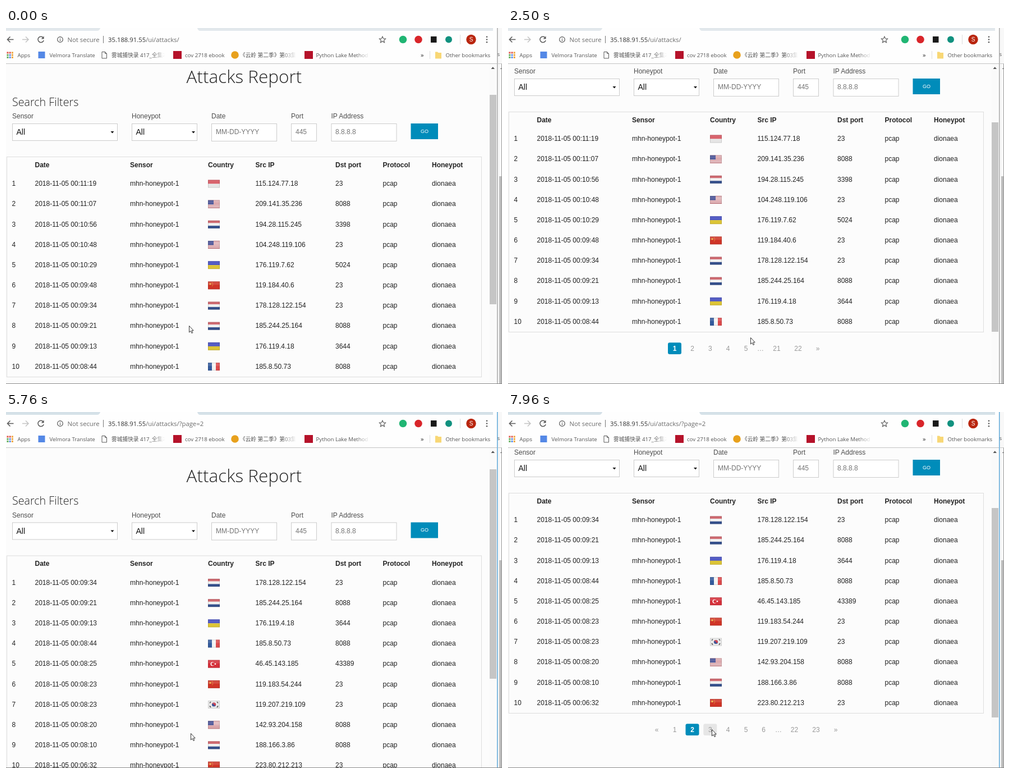
Animation of 884x634 px, one loop 8000 ms. Source, as an HTML page:

```html
<!DOCTYPE html>
<html lang="en">
<head>
<meta charset="utf-8">
<title>Attacks Report</title>
<style>
html, body { margin: 0; width: 100%; height: 100%; overflow: hidden; background: #fefefe; }
svg { display: block; }
text { font: 12px "Liberation Sans", Arial, sans-serif; fill: #222; white-space: pre; }
.bold { font-weight: bold; }
.light { font-family: "Open Sans", sans-serif; font-weight: 300; }
.h1 { font-size: 31.5px; }
.h2 { font-size: 19.7px; }
.label { fill: #4d4d4d; }
.hint { fill: #757575; }
.all { font-size: 14px; fill: #111; }
.go { font-size: 9px; fill: #fff; }
.mid { text-anchor: middle; }
.off { fill: #999; }
.on { fill: #fff; font-weight: bold; }
.url { font: 11.3px "Open Sans", sans-serif; fill: #333; }
.grey { fill: #6b6b6b; }
.mark { font: 9.7px "Open Sans", "Noto Sans CJK SC", sans-serif; fill: #555; }
.field { fill: #fff; stroke: #ccc; }
.icon { fill: none; stroke: #5a5a5a; stroke-width: 1.5; }
</style>
</head>
<body>
<svg id="stage" width="884" height="634" viewBox="0 0 884 634"></svg>
<script>
const LOOP = 8000;
const text = (x, y, s, cls = "") => `<text x="${x}" y="${y}" class="${cls}">${s}</text>`;
const rect = (x, y, w, h, fill, extra = "") =>
  `<rect x="${x}" y="${y}" width="${w}" height="${h}" fill="${fill}" ${extra}/>`;
const dot = (x, y, r, fill) => `<circle cx="${x}" cy="${y}" r="${r}" fill="${fill}"/>`;
const path = (d, attrs) => `<path d="${d}" ${attrs}/>`;
const field = (x, y, w, h) => rect(x + .5, y + .5, w - 1, h - 1, "#fff", 'class="field"');
const bands = (...colors) => colors.map((c, i) => rect(0, i * 14 / colors.length, 21, 14 / colors.length, c)).join("");

const flags = {
  id: bands("#d4505a", "#e6e6e6"),
  nl: bands("#c8565e", "#f0f0f0", "#35508c"),
  ua: bands("#3e46bd", "#dcc436"),
  cn: rect(0, 0, 21, 14, "#cf3427") + dot(4, 4.5, 1.7, "#e8b23a") +
    [[7.5, 2], [8.5, 4], [8.5, 6.3], [7.5, 8]].map(p => dot(...p, .6, "#e8b23a")).join(""),
  fr: rect(0, 0, 7, 14, "#335a9c") + rect(7, 0, 7, 14, "#f2f2f2") + rect(14, 0, 7, 14, "#dc4a4c"),
  us: bands(...Array.from({ length: 13 }, (_, i) => i % 2 ? "#eee" : "#c2525c")) + rect(0, 0, 10, 7.5, "#454f94"),
  tr: rect(0, 0, 21, 14, "#d5303a") + dot(8, 7, 3.5, "#fff") + dot(9, 7, 2.8, "#d5303a") + dot(13, 7, 1.3, "#fff"),
  kr: rect(0, 0, 21, 14, "#e9e9e9") + dot(10.5, 7, 3.6, "#3a5499") +
    path("M6.9 7a3.6 3.6 0 0 1 7.2 0a1.8 1.8 0 0 1-3.6 0a1.8 1.8 0 0 0-3.6 0", 'fill="#cf3a48"') +
    path("M3 4.5l2-2.5M16 2l2 2.5M3 9.5l2 2.5M16 12l2-2.5", 'stroke="#555" stroke-width="1.8"')
};

// time, flag, address, port
const attacks = `11:19 id 115.124.77.18 23
11:07 us 209.141.35.236 8088
10:56 nl 194.28.115.245 3398
10:48 us 104.248.119.106 23
10:29 ua 176.119.7.62 5024
09:48 cn 119.184.40.6 23
09:34 nl 178.128.122.154 23
09:21 nl 185.244.25.164 8088
09:13 ua 176.119.4.18 3644
08:44 fr 185.8.50.73 8088
08:25 tr 46.45.143.185 43389
08:23 cn 119.183.54.244 23
08:23 kr 119.207.219.109 23
08:20 us 142.93.204.158 8088
08:10 nl 188.166.3.86 8088
06:32 cn 223.80.212.213 23`.split("\n").map(r => r.split(" "));

const columns = [51.5, 221, 360, 444.5, 587, 671.5, 759];

function row([time, flag, ip, port], i) {
  const y = 281.3 + i * 36.17;
  const cells = ["2018-11-05 00:" + time, "mhn-honeypot-1", "", ip, port, "pcap", "dionaea"];
  return text(10.5, y, i + 1) + cells.map((c, k) => text(columns[k], y, c)).join("") +
    `<g transform="translate(360 ${y - 10.8})">${flags[flag]}` +
    rect(0, 0, 21, 6, "#fff", 'opacity=".12"') +
    rect(.5, .5, 20, 13, "none", 'stroke="#000" stroke-opacity=".12"') + "</g>";
}

const pagers = {
  1: { names: "1 2 3 4 5 … 21 22 »", at: [297, 328.5, 360.3, 392, 424, 450, 479, 517, 552] },
  2: { names: "« 1 2 3 4 5 6 … 22 23 »", at: [265, 297, 328.5, 360.3, 392, 424, 455.5, 482, 510.5, 549, 584] }
};

function pager(page, hover) {
  const { names, at } = pagers[page];
  return names.split(" ").map((n, i) => {
    const on = n == page, fill = on ? "#008cba" : "#e6e6e6";
    const box = on || n == hover ? rect(at[i] - 12, 640.3, 24, 20.7, fill, 'rx="3"') : "";
    return box + text(at[i], 655, n, "mid " + (on ? "on" : "off"));
  }).join("");
}

const heads = ["Date", "Sensor", "Country", "Src IP", "Dst port", "Protocol", "Honeypot"];
const drop = x => path(`M${x} 184h6l-3 3.5z`, 'fill="#111"');
const form = text(321.5, 98, "Attacks Report", "light h1") + text(11, 138.5, "Search Filters", "light h2") +
  [[11, "Sensor"], [224, "Honeypot"], [366, "Date"], [508, "Port"], [579.5, "IP Address"]]
    .map(([x, s]) => text(x, 161, s, "label")).join("") +
  field(11, 170, 188, 31) + field(224, 170, 117, 31) + field(366, 170, 117, 32) +
  field(508, 170, 46, 32) + field(579.5, 170, 117, 32) +
  text(18.5, 190, "All", "all") + text(231.5, 190, "All", "all") + drop(186.5) + drop(331) +
  text(374, 189.3, "MM-DD-YYYY", "hint") + text(516, 189.3, "445", "hint") + text(587, 189.3, "8.8.8.8", "hint") +
  rect(721.5, 170, 48.5, 28, "#008cba") + text(746, 186.5, "GO", "go mid") +
  rect(1.5, 229.5, 846, 392, "none", 'stroke="#ddd"') +
  heads.map((h, i) => text(columns[i], 247.6, h, "bold")).join("");

const content = (page, hover) => form +
  attacks.slice(page == 1 ? 0 : 6, page == 1 ? 10 : 16).map(row).join("") + pager(page, hover);

const fade = x => rect(x - 24, 40, 24, 18, "url(#fade)") + rect(x, 40, 14, 18, "#fefefe");
const appColors = ["#e2574c", "#e2574c", "#f0a63c", "#5fae57", "#5b8def", "#f0a63c", "#5fae57", "#5b8def", "#f0a63c"];

const chrome = rect(0, 0, 875, 63, "#fefefe") +
  `<g id="strip">` + path("M0 0H168Q167 5 162 5H0zM341 0H868V5H346Q342 5 341 0z", "") + "</g>" +
  path("M13.5 20.5H3M7.5 15.5L2.5 20.5L7.5 25.5", 'class="icon"') +
  path("M29 20.5H39.5M35 15.5L40 20.5L35 25.5", 'class="icon" style="stroke:#c4c4c4"') +
  `<g id="reload">` + path("M66.3 17.2A5.2 5.2 0 1 0 67.2 22", 'class="icon"') + path("M67.6 14.5V19.5H62.6z", 'fill="#5a5a5a"') + "</g>" +
  path("M57.5 16L67 25.5M67 16L57.5 25.5", 'id="stop" class="icon"') +
  `<circle cx="96.5" cy="20.5" r="4.8" class="icon" style="stroke-width:1.2"/>` +
  path("M96.5 20V23.3M96.5 17.7V18.9", 'class="icon" style="stroke-width:1.2"') +
  text(109.5, 24.8, "Not secure", "url grey") + rect(173, 14, 1, 13, "#777") +
  `<text id="url" x="182" y="24.8" class="url"></text>` +
  path("M671 15.2l1.6 3.6 4 .4-3 2.7.9 3.9-3.5-2.1-3.5 2.1.9-3.9-3-2.7 4-.4z", 'class="icon" style="stroke-width:1.1"') +
  dot(707.5, 20.5, 6.8, "#20b573") + dot(735, 20.5, 6.8, "#d9252a") +
  rect(757, 15, 10.5, 11, "#191919") + dot(789, 20.5, 6, "#11917f") + rect(809, 12, 1, 17, "#ddd") +
  dot(829, 20.5, 8.7, "#b9260f") + `<text x="829" y="24" class="mid" style="font-size:10px;fill:#fff">S</text>` +
  [15.8, 20.5, 25.2].map(y => dot(857, y, 1.3, "#5a5a5a")).join("") +
  appColors.map((c, i) => rect(1.5 + i % 3 * 4.2, 42.5 + (i / 3 | 0) * 4.2, 3, 3, c)).join("") +
  text(20.5, 52, "Apps", "mark") +
  rect(57.5, 42, 12, 12, "#5488e6") + text(77.5, 52, "Velmora Translate", "mark") +
  path("M171 42.5H176.5L179.5 45.5V54H171zM176.5 42.5V45.5H179.5", 'class="icon" style="stroke-width:1"') +
  text(188, 52, "雾城捕快录 417_全集本", "mark") + fade(283) +
  rect(298, 41, 15, 14, "#b5122a") + text(319, 52, "cov 2718 ebook", "mark") +
  dot(408, 48, 6.8, "#e8a11d") + text(417, 52, "《云岭 第二季》第03集", "mark") + fade(517) +
  rect(532, 41, 15, 14, "#b5122a") + text(552.5, 52, "Python Lake Method", "mark") + fade(648) +
  text(739, 52, "»", "url") + rect(755, 41, 1, 14, "#ddd") +
  path("M765 42.5H769L770.5 44H776V54.5H765z", 'fill="#f8d775"') + text(783.5, 52, "Other bookmarks", "mark") +
  rect(0, 63, 875, 1, "#c2c2c2");

const edge = rect(875, 0, 9, 634, "#f8f8f8") + rect(877, 63, 7, 1, "#c8c8c8") + text(875.5, 50, "s", "mark") +
  path("M880.5 73h4v-3z", 'fill="#666"') + rect(879, 264, 5, 370, "#bcbcbc") + rect(883, 64, 1, 570, "#9a9a9a") +
  rect(875, 0, 1.5, 634, "#aaa", 'id="border"') + rect(0, 633, 884, 1, "#8a8a8a");

const stage = document.getElementById("stage");
stage.innerHTML = `<defs><linearGradient id="fade"><stop stop-color="#fefefe" stop-opacity="0"/>
<stop offset="1" stop-color="#fefefe"/></linearGradient></defs>` +
  rect(0, 64, 875, 570, "#fcfcfc") + `<g id="page"></g>` +
  rect(862, 64, 13, 570, "#fafafa") + path("M864.5 73H871L867.7 69.3z", 'fill="#555"') +
  rect(862, 0, 12, 373, "#c5c5c5", 'id="thumb"') + chrome + edge +
  `<g stroke="#222" fill="#fff" stroke-width=".9" stroke-linejoin="round">` +
  path("M.5.5V12L3.2 9.5L5 13.5L6.8 12.7L5 8.8H8.2z", 'id="arrow"') +
  path("M4 10V2Q4 .5 5.1.5T6.3 2V6.5Q8.3 5.7 8.6 7.2Q10.3 6.5 10.7 8Q12.6 7.5 12.6 9.5V12Q12.4 14 11.3 16.5H5.2Q4.6 14.7 1.2 11Q.2 9.5 1.6 8.9Q2.7 8.6 4 10zM6.3 6.5V9.5M8.6 7.2V9.7M10.7 8V10", 'id="hand"') + "</g>";
const $ = id => document.getElementById(id);

// each entry holds from its time until the next one
const scroll = [[0, 0], [1110, -4], [1260, -22], [1390, -49], [1540, -61], [1820, -72], [1940, -79], [2090, -80],
  [4900, 62], [5760, 26.5], [5880, -6], [6000, -34], [6270, -43], [6400, -56], [6550, -72.5], [6820, -82], [6940, -85]];
const pointer = [[0, 326, 530], [410, -50, 0], [560, 474, 587], [680, 485, 557], [830, 487, 551], [2500, 432, 551],
  [2640, 403, 553], [2760, 361, 559], [2880, 321, 565, "hand"], [3030, 314, 569, "hand"], [4230, 315, 569, "hand"],
  [4350, 320, 571, "hand"], [4470, 325, 572, "hand"], [4750, 329, 572], [7220, 342, 567], [7370, 353, 566, "hand"],
  [7500, 359, 565, "hand"], [7960, 363, 565]];
const hovered = [[0, 0], [2880, 2], [4900, 0], [7370, 3]];
const at = (track, t) => track.findLast(k => k[0] <= t).slice(1);
const show = (id, on) => $(id).setAttribute("visibility", on ? "visible" : "hidden");

let drawn = "";
function draw(now) {
  const t = now % LOOP;
  const page = t < 4900 ? 1 : 2, [hover] = at(hovered, t), [y] = at(scroll, t), [px, py, kind] = at(pointer, t);
  if (drawn !== page + "/" + hover) {
    drawn = page + "/" + hover;
    $("page").innerHTML = content(page, hover);
  }
  $("page").setAttribute("transform", `translate(0 ${y})`);
  $("thumb").setAttribute("y", Math.round(118.6 - y * .615));
  $("url").innerHTML = `35.188.91.55<tspan class="grey">/ui/attacks/${t < 4350 ? "" : "?page=2"}</tspan>`;
  const loading = t >= 3580 && t < 5020, active = t >= 3300;
  show("stop", loading);
  show("reload", !loading);
  $("strip").setAttribute("fill", active ? "#d5e1e8" : "#e2e8ec");
  $("border").setAttribute("fill", active ? "#5fa8d8" : "#aaa");
  show("hand", kind);
  show("arrow", !kind);
  $(kind || "arrow").setAttribute("transform", `translate(${px} ${py})`);
  requestAnimationFrame(draw);
}
draw(0);
</script>
</body>
</html>
```
